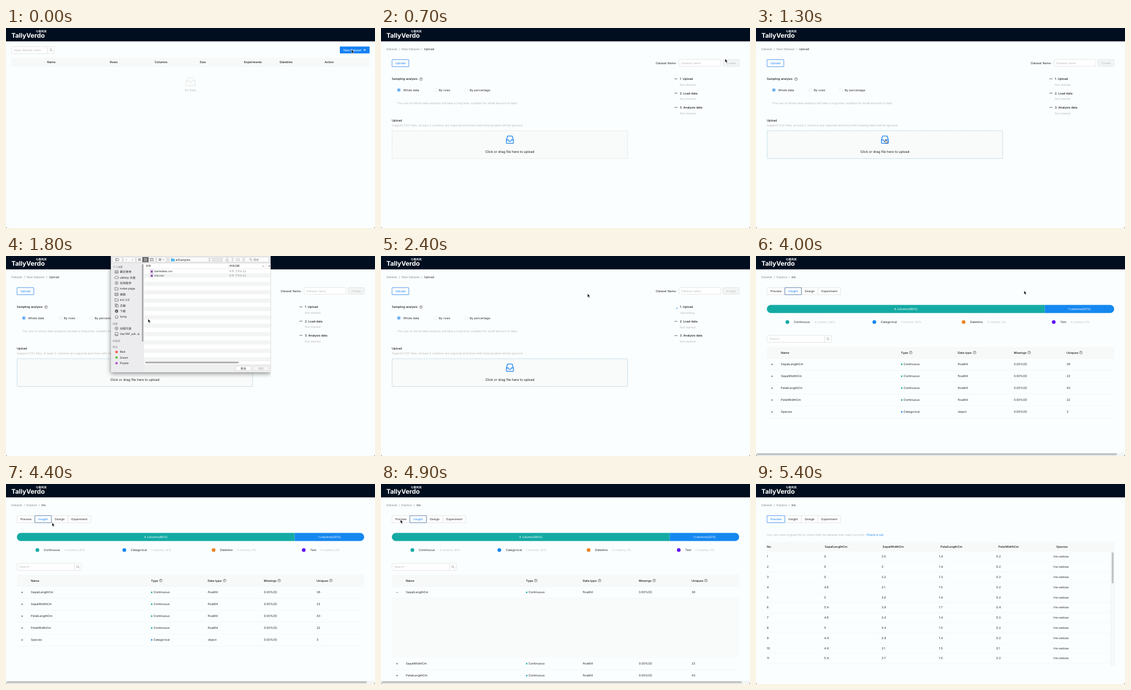
Write an HTML page that moves like this. It is 682 px wide and 370 px high and loops after 5.5 s.

```html
<!DOCTYPE html>
<html lang="en">
<head>
<meta charset="utf-8">
<title>Dataset upload</title>
<style>
html, body { margin: 0; width: 100%; height: 100%; overflow: hidden; background: #fbfefe; }
svg { display: block; width: 682px; height: 370px; }
text { font-family: Inter, "Noto Sans CJK SC", "Noto Sans CJK", sans-serif; text-rendering: geometricPrecision; white-space: pre; }
</style>
</head>
<body>
<svg id="stage" viewBox="0 0 682 370" xmlns="http://www.w3.org/2000/svg"></svg>
<script>
const LOOP = 5500, STEP = 100;
const BLUE = '#1681f5', INK = '#262829', GREY = '#b9bbbb', LINE = '#dadcdc', TEAL = '#14aaa4';
const stage = document.getElementById('stage');

// y is the vertical middle of the text
const text = (x, y, s, { c = INK, size = 5.5, w = 400, a = 'start' } = {}) =>
  `<text x="${x}" y="${y + size * 0.36}" fill="${c}" font-size="${size}" font-weight="${w}" text-anchor="${a}">${s}</text>`;
const mid = (x, y, s, o = {}) => text(x, y, s, { ...o, a: 'middle' });
const bold = (x, y, s) => text(x, y, s, { w: 500, c: '#161818' });
const pale = (x, y, s, o = {}) => text(x, y, s, { c: GREY, ...o });
const rect = (x, y, w, h, fill, stroke = 'none', rx = 0, more = '') =>
  `<rect x="${x}" y="${y}" width="${w}" height="${h}" fill="${fill}" stroke="${stroke}" stroke-width=".7" rx="${rx}" ${more}/>`;
const dot = (x, y, r, fill, stroke = 'none', sw = 0.6) =>
  `<circle cx="${x}" cy="${y}" r="${r}" fill="${fill}" stroke="${stroke}" stroke-width="${sw}"/>`;
const path = (d, stroke, sw = 0.7, fill = 'none') =>
  `<path d="${d}" stroke="${stroke}" stroke-width="${sw}" fill="${fill}" stroke-linejoin="round"/>`;
const at = (x, y, s) => `<g transform="translate(${x} ${y})">${s}</g>`;
const list = (items, f) => items.map(f).join('');

const help = (x, y) => dot(x, y, 2.6, 'none', '#444') + mid(x, y, '?', { size: 4.2, w: 600, c: '#444' });
const lens = (x, y) => dot(x - 0.5, y - 0.6, 1.9, 'none', '#888') + path(`M${x + 0.9} ${y + 0.8}l1.7 1.8`, '#888', 0.8);

function frame() {
  return rect(0, 0, 682, 370, '#fbfefe') + rect(0, 0, 682, 24.7, '#010e1f') +
    text(10, 14.2, 'TallyVerdo', { c: '#fff', size: 11.8, w: 700 }) +
    text(55, 6.3, '七卷风岚', { c: '#fff', size: 5, w: 700 });
}

const corners = () => path('M0 370v-2q.2 1.8 2 2zM682 370v-2q-.2 1.8-2 2z', 'none', 0, '#111');

function search(x, y, w, hint) {
  return rect(x, y, w, 12.6, '#fff', LINE, 1) + rect(x + w, y, 12.3, 12.6, '#fff', LINE, 1) +
    pale(x + 4.3, y + 6.3, hint) + lens(x + w + 6.2, y + 6.3);
}

function crumbs(parts) {
  return list(parts, ([x, s], i) => text(x, 39, s, { c: i === parts.length - 1 ? INK : '#8b8d8d' }));
}

// tabs: [left, right, label]
function tabs(items, active, tint = BLUE) {
  const box = ([l, r], stroke) => rect(l, 58.6, r - l, 13, stroke === LINE ? '#fff' : 'none', stroke, 0.6);
  return list(items, i => box(i, LINE)) + box(items[active], tint) +
    list(items, ([l, r, s], n) => mid((l + r) / 2, 65.2, s, { c: n === active ? BLUE : INK }));
}

function homePage(t) {
  const heads = [[76, 'Name'], [192, 'Rows'], [275, 'Columns'], [358, 'Size'], [440, 'Experiments'], [506, 'Datetime'], [589, 'Action']];
  let s = search(10.4, 34.5, 66.6, 'Input dataset name') +
    rect(617, 34.3, 55, 12.8, BLUE, 'none', 1) +
    text(623.7, 40.8, 'New Dataset', { c: '#fff' }) +
    path('M660.6 39.4h4.4l-2.2 2.9z', 'none', 0, '#fff') +
    rect(10, 54.6, 662, 16.6, '#f7f9f9') + path('M10 71.3h662', '#eef0f0', 0.5) +
    list(heads, ([x, h]) => bold(x, 62.9, h)) +
    `<ellipse cx="341" cy="105.5" rx="11" ry="2.4" fill="#f1f3f3"/>` +
    path('M332.5 97.5l3.4-5.6h10.2l3.4 5.6v8.3q0 1-1 1h-15q-1 0-1-1z', '#d5d7d7', 0.6, '#fafbfb') +
    path('M332.5 97.5h4.6q.9 0 1 1.1.2 1.5 1.4 1.5h3q1.200 0 1.400-1.500.1-1.100 1-1.100h4.600', '#d5d7d7', 0.6) +
    mid(341, 114.7, 'No Data', { c: GREY });
  if (t >= 300) {
    s += rect(616.6, 49, 55.8, 35, '#fff', 'none', 1, 'style="filter:drop-shadow(0 .8px 1.2px #0003)"') +
      (t >= 500 ? rect(616.6, 51, 55.8, 15.5, '#e8f5fd') : '') +
      text(622, 58.8, 'Upload') + text(622, 74.4, 'Import');
  }
  return s;
}

const tick = (x, y) => path(`M${x} ${y}l1.900 2 3.700-4.500`, '#2fa34a', 0.9);
const dash = (x, y) => path(`M${x} ${y}h5.500`, '#555', 0.9);

function steps(t) {
  const busy = t >= 2300 && t < 2600;
  const done = [2600, 2800, 3000].map(v => t >= v);
  const titles = ['1. Upload', '2. Load data', '3. Analysis data'];
  const notes = [
    ['Elapsed 0.00s, file size 4.50 KB'],
    ['Elapsed 0.03s, data shape is (151,', '5),&#160; load 151 rows'],
    ['Elapsed 0.09s, there are 4', 'continuous, 1 categorical, 0', 'datetime features']
  ];
  let y = 94.3, s = '';
  titles.forEach((title, i) => {
    const spin = busy && i === 0;
    const lines = done[i] ? notes[i] : [spin ? 'Uploading...' : 'Not started'];
    if (done[i]) s += tick(542.3, y);
    else if (spin) {
      s += `<path d="M548.400 94.800q.100 2.600-3.400 3" fill="none" stroke="${BLUE}" stroke-width=".8" transform="rotate(${(t - 2400) * 0.3} 546.200 95.600)"/>`;
    } else s += dash(542.3, y - 0.2);
    s += bold(552.3, y, title);
    lines.forEach((l, n) => { s += pale(552.3, y + 10.7 + n * 9, l); });
    y += 26.4 + (lines.length - 1) * 9 + (spin ? 0.4 : 0);
  });
  return s;
}

function inbox(x, y) {
  return at(x, y, path('M-6.400 .6l2.200-7.200h8.400l2.200 7.200v5.600q0 .8-.8.8h-11.200q-.8 0-.8-.8z', BLUE, 1.3) +
    path('M-6.400 .6h3.700q.4 2.800 2.700 2.800t2.700-2.800h3.700', BLUE, 1.3));
}

function uploadPage(t) {
  const ready = t >= 3100, hover = t >= 1200 && t < 2600;
  const bar = [[20.4, 51.4, 'Upload'], [51.4, 84.5, 'Preview'], [84.5, 115.4, 'Insight']];
  const radios = [[33, 41, 'Whole data'], [100.7, 107, 'By rows'], [157.3, 164, 'By percentage']];
  return crumbs([[10, 'Dataset'], [33, '/'], [38, 'New Dataset'], [74.3, '/'], [79.5, 'Upload']]) +
    tabs(ready ? bar : bar.slice(0, 1), 0) +
    text(508, 64.6, 'Dataset Name :') +
    rect(551, 58.3, 77, 12.4, '#fff', LINE, 1) +
    (ready ? text(555, 64.6, 'iris') : pale(555, 64.6, 'Dataset name')) +
    rect(632.3, 58.3, 29.6, 12.4, ready ? BLUE : '#f3f5f5', ready ? BLUE : LINE, 1) +
    mid(647.1, 64.6, 'Create', { c: ready ? '#fff' : GREY }) +
    bold(20, 94.5, 'Sampling analysis') + help(74, 94.5) +
    list(radios, ([x, l, s], i) => dot(x, 114.7, 3, '#fff', i ? LINE : BLUE) +
      (i ? '' : dot(x, 114.7, 1.7, BLUE)) + text(l, 114.8, s)) +
    pale(30, 138.6, 'The use of whole data analysis will take a long time, suitable for small amount of data') +
    bold(20, 171, 'Upload') +
    pale(20, 180, 'Support CSV files, at least 2 columns are required and lines with missing label will be ignored') +
    rect(20.4, 190, 435.5, 51.6, '#f9fafa', hover ? '#86bcd6' : '#d3d5d5', 1, 'stroke-dasharray="2 1.200"') +
    inbox(238.2, 206.4) +
    mid(238.2, 228.6, 'Click or drag file here to upload', { size: 6.1, c: '#161818' }) +
    steps(t);
}

const folder = (x, y, c, fill = 'none') => path(`M${x - 3} ${y - 2.400}h2.300l.8.9h2.900v4h-6z`, c, 0.7, fill);

const glyphs = {
  box: (x, y) => rect(x - 3, y - 2.4, 6, 4.8, 'none', '#555', 0.6) + path(`M${x - 3} ${y - 0.6}h6M${x - 3} ${y + 1}h6`, '#555', 0.5),
  cloud: (x, y) => path(`M${x - 2.200} ${y + 2}q-1.500-.1-1.500-1.500 0-1.300 1.400-1.500.5-1.700 2.300-1.700 1.700 0 2.200 1.500 1.700.1 1.700 1.600 0 1.500-1.500 1.600z`, '#555'),
  disc: (x, y) => dot(x, y, 2.8, 'none', '#555', 0.7) + dot(x, y, 0.9, '#555'),
  solid: (x, y) => dot(x, y, 3, '#555') + path(`M${x} ${y - 1.600}v3M${x - 1.200} ${y + 0.300}l1.200 1.200 1.200-1.200`, '#eee'),
  folder: (x, y) => folder(x, y, '#555'),
  pages: (x, y) => rect(x - 2.6, y - 2.8, 3.7, 4.5, 'none', '#555') + rect(x - 0.8, y - 1.4, 3.7, 4.4, '#ececee', '#555'),
  home: (x, y) => path(`M${x - 3.200} ${y}l3.200-3 3.200 3M${x - 2.200} ${y - 0.500}v3.300h4.400v-3.300`, '#555'),
  drive: (x, y) => rect(x - 2.6, y - 3, 5.2, 6, 'none', '#555', 0.6) + path(`M${x - 2.600} ${y + 1.300}h5.200`, '#555')
};

function sidebar() {
  const items = [[29.5, 'box', '最近使用'], [39.8, 'cloud', 'uMisty 云盘'], [50, 'disc', '应用程序'], [60.5, 'folder', 'notes.page'],
    [71, 'box', '桌面'], [81.2, 'folder', 'kvt-3.0'], [91.6, 'pages', '文稿'], [102, 'solid', '下载'], [112.5, 'home', 'lomq'],
    [134, 'disc', '远程光盘'], [144.5, 'drive', 'VexTAP_edi…']];
  const heads = [[20, '个人收藏'], [125, '设备'], [157, '共享的'], [168.3, '标记']];
  const tags = [[177.5, '#fc4b48', 'Red'], [187.8, '#62c13a', 'Green'], [198.2, '#b45bd0', 'Purple']];
  return rect(194, 14, 61, 201, '#ececee') +
    list(heads, ([y, s]) => text(197, y, s, { size: 4.7, c: '#777', w: 500 })) +
    list(items, ([y, g, s]) => glyphs[g](204.3, y) + text(210.5, y, s, { size: 5.3 })) +
    list(tags, ([y, c, s]) => dot(204.3, y, 2.3, c) + text(210.5, y, s, { size: 5.3 })) +
    path('M243.300 144.500l1.700-2 1.700 2zM243.300 145.300h3.400v.7h-3.400z', 'none', 0, '#555') +
    rect(251, 15, 3, 143.5, '#aeaeb0', 'none', 1.5);
}

function toolbar() {
  const btn = (x, w) => rect(x, 2, w, 9.4, '#fbfbfb', '#d0d0d0', 1.5);
  const cells = x => [0, 1, 2, 3].map(i => rect(x + (i % 2) * 2.4, 4.6 + (i >> 1) * 2.4, 1.7, 1.7, '#666')).join('');
  return rect(194, 0, 295, 14, '#e6e6e7') +
    btn(196.5, 18) + rect(202.5, 4.7, 6, 4.2, 'none', '#666') + path('M204.500 4.700v4.200', '#666') +
    btn(217, 22) + path('M223.500 4.800l-2 2 2 2M232.500 4.800l2 2-2 2', '#888') +
    btn(241, 35) + rect(252, 2, 11.6, 9.4, '#666') + cells(244.6) +
    path('M255 4.800h5.600M255 6.800h5.600M255 8.800h5.600', '#fff') +
    rect(266.5, 4.6, 5.6, 4.4, 'none', '#666') + path('M268.400 4.600v4.400M270.300 4.600v4.400', '#666', 0.5) +
    btn(278.5, 18) + cells(282.5) + path('M289.500 6l1.500 1.600 1.500-1.600', '#666') +
    btn(302, 79) + folder(308.3, 6.9, '#3aa7de', '#55bdec') + text(313.3, 6.8, 'allSamples', { size: 5.4 }) +
    path('M374.500 5.900l1.500-1.700 1.500 1.700M374.500 7.800l1.500 1.700 1.500-1.700', '#555') +
    btn(400, 17.5) + path('M407.500 6h-1v3.500h4.600v-3.500h-1M408.800 8v-4.300M407.500 4.800l1.300-1.300 1.300 1.300', '#999', 0.6) +
    btn(420, 17.5) + rect(425.5, 5, 6.4, 3.8, 'none', '#999', 1.6) +
    btn(441, 45) + lens(452.5, 6.8) + text(457, 6.8, '搜索', { size: 5.2, c: '#888' });
}

function dialog(t) {
  const drop = { 1500: -150, 1600: -45 }[t] || 0;
  const picked = t >= 2100;
  const files = [[28.2, 'bankdata.csv'], [35.9, 'iris.csv']];
  let s = rect(194, 0, 295, 215, '#f0f0f0', '#bbb', 1, 'style="filter:drop-shadow(0 2px 4px #0007)"') +
    rect(255, 14, 234, 187, '#fff');
  for (let i = 1; i < 22; i += 2) s += rect(255, 24.4 + i * 7.75, 234, 7.75, '#f3f4f4');
  if (picked) s += rect(255, 32.1, 234, 7.8, '#1565d8');
  s += path('M255 23.700h234M411 15v8M480.500 15v8', '#d5d5d5', 0.5) +
    text(258.5, 18.8, '名称', { size: 4.7 }) + text(413, 18.8, '修改日期', { size: 4.7 }) + text(485, 18.8, '大', { size: 4.7 }).replace('大', 'A') +
    path('M473.500 18l1.700 1.600 1.700-1.600', '#555') +
    list(files, ([y, n], i) => {
      const on = picked && i === 1;
      return rect(267, y - 3, 4.6, 6, '#fff', '#b9a3c4') + rect(267.7, y - 1, 3.2, 3.2, '#7b2f9b') +
        text(274.3, y, n, { size: 5.3, c: on ? '#fff' : INK }) +
        text(412, y, '今天 下午6:32', { size: 4.9, c: on ? '#fff' : '#8a8a8a' });
    }) +
    rect(257, 195.6, 173, 3, '#a9a9a9', 'none', 1.5) +
    rect(255, 201, 234, 14, '#efefef') + path('M255 201h234', '#d5d5d5', 0.5) +
    rect(424.5, 203.8, 28.5, 8, '#fff', '#cfcfcf', 1.5) + mid(438.7, 207.8, '取消', { size: 5 }) +
    rect(457, 203.8, 28, 8, '#f6f6f6', '#dcdcdc', 1.5) + mid(471, 207.8, '选取', { size: 5, c: picked ? INK : '#aaa' }) +
    sidebar() + toolbar();
  return `<clipPath id="sheet"><rect x="180" width="309.500" height="235"/></clipPath><g clip-path="url(#sheet)">${at(0, drop, s)}</g>`;
}

const exploreTabs = [[20.4, 53.3, 'Preview'], [53.3, 84, 'Insight'], [84, 114.6, 'Design'], [114.6, 156.6, 'Experiment']];
const exploreTop = (n, tint) => crumbs([[10, 'Dataset'], [33, '/'], [38, 'Explore'], [60.3, '/'], [65.4, 'iris']]) + tabs(exploreTabs, n, tint);

function insightPage(t) {
  const open = t >= 4600 ? 110 : 0;
  const kinds = [[58, TEAL, 'Continuous', 108, '4 columns, 80%'], [218.7, '#1588f0', 'Categorical', 268, '1 columns, 20%'],
    [383.7, '#ea8428', 'Datetime', 427, '0 columns, 0%'], [550.3, '#6214f5', 'Text', 581, '0 columns, 0%']];
  const heads = [[46, 'Name'], [268, 'Type', 286], [373, 'Data type', 404], [476.5, 'Missings', 504.8], [574, 'Uniques', 600.5]];
  const rows = [['SepalLengthCm', 36], ['SepalWidthCm', 23], ['PetalLengthCm', 43], ['PetalWidthCm', 22], ['Species', 3]];
  return exploreTop(1, '#2f6298') +
    path('M533.700 90.500h-506.200a7.500 7.500 0 0 0 0 15h506.200z', 'none', 0, TEAL) +
    path('M533.700 90.500h120.800a7.500 7.500 0 0 1 0 15h-120.800z', 'none', 0, '#1588f0') +
    mid(277, 98.2, '4 columns(80%)', { c: '#fff' }) + mid(597.8, 98.2, '1 columns(20%)', { c: '#fff' }) +
    list(kinds, ([x, c, k, vx, v]) => dot(x, 122.2, 3.4, c) + text(x + 12, 122.2, k) + pale(vx, 122.2, v, { size: 5 })) +
    search(20.4, 147, 106.4, 'Search') +
    rect(20, 168, 642, 21.3, '#f7f9f9') + path('M20 189.400h642', '#eceeee', 0.5) +
    list(heads, ([x, h, q]) => bold(x, 178.6, h) + (q ? help(q, 178.6) : '')) +
    (open ? rect(20, 211.5, 642, open, '#f9fafa') : '') +
    list(rows, ([name, uniq], i) => {
      const y = 200.5 + i * 22 + (i ? open : 0), last = i === 4;
      return path(`M27.900 ${y}h3.600` + (open && !i ? '' : `M29.700 ${y - 1.800}v3.600`), '#444', 0.6) +
        text(46, y, name) + dot(269.3, y, 1.4, last ? '#1588f0' : TEAL) +
        text(272.7, y, last ? 'Categorical' : 'Continuous') +
        text(373, y, last ? 'object' : 'float64') + text(476.5, y, '0.00%(0)') + text(574, y, uniq) +
        path(`M20 ${y + 11}h642`, '#eceeee', 0.5);
    }) +
    rect(0, 364, 682, 6, '#f3f5f5') + rect(1, 365, 666, 3.6, '#bfc1c1', 'none', 1.8);
}

function previewPage() {
  const heads = ['No.', 'SepalLengthCm', 'SepalWidthCm', 'PetalLengthCm', 'PetalWidthCm', 'Species'];
  const rows = ['0 3.5 1.4 0.2', '0 3 1.4 0.2', '0 3.2 1.3 0.2', '4.6 3.1 1.5 0.2', '5 3.6 1.4 0.2', '5.4 3.9 1.7 0.4',
    '4.6 3.4 1.4 0.3', '5 3.4 1.5 0.2', '4.4 2.9 1.4 0.2', '4.9 3.1 1.5 0.1', '5.4 3.7 1.5 0.2'];
  return exploreTop(0) +
    pale(20, 94.5, 'You can view original file to check that the dataset was read correctly') +
    text(204.3, 94.5, 'Check it out', { c: BLUE }) +
    rect(20, 107, 642, 18, '#f7f9f9') +
    list(heads, (h, i) => bold(20 + i * 107, 116.2, h)) +
    list(rows, (r, i) => {
      const y = 134.5 + i * 18.8;
      return list([i + 1, ...r.split(' '), 'Iris-setosa'], (v, n) => text(20 + n * 106, y, v)) +
        path(`M20 ${y + 9.400}h636`, '#eff1f1', 0.5);
    }) +
    rect(656.2, 125, 5.8, 210, '#f8f9f9', '#e9ebeb') + rect(657.5, 126.5, 3.4, 57.5, '#bfc1c1', 'none', 1.7);
}

// pointer: time, x, y
const moves = [[0, 638.5, 39.8], [300, 640, 42], [500, 636, 57], [700, 636, 57], [1200, 239.5, 206.5], [1500, 239.5, 206.5],
  [1800, 262.7, 116.5], [2100, 282, 36], [2200, 282, 36], [2400, 381.8, 69.8], [3500, 384.3, 71.6], [3600, 384.3, 71.6],
  [3800, 645, 64], [3900, 645, 64], [4200, 68, 65], [4400, 85.2, 71.6], [4600, 29.5, 200], [4700, 29.5, 200], [4900, 36, 66], [5100, 36, 66]];

function pointer(t) {
  if (t > 5100) return '';
  const n = moves.findIndex(m => m[0] > t);
  const [a, b] = n < 1 ? [moves[moves.length - 1], moves[moves.length - 1]] : [moves[n - 1], moves[n]];
  const u = a === b ? 0 : (t - a[0]) / (b[0] - a[0]), e = u * u * (3 - 2 * u);
  const hand = t >= 1200 && t < 1500;
  const shape = hand
    ? path('M-.7 3.500v-3q0-.8.7-.8t.7.800v2l2.700.600q.8.200.7 1l-.5 2.100h-3.600l-2-2.200q-.4-.7.300-.900z', '#222', 0.7, '#fff')
    : path('M0 0v6.600l1.500-1.400 1.100 2.500 1.200-.5-1.100-2.400h2z', '#fff', 0.5, '#000');
  return at(a[1] + (b[1] - a[1]) * e, a[2] + (b[2] - a[2]) * e, shape);
}

function page(t) {
  if (t < 700) return homePage(t);
  if (t < 4000) return uploadPage(t) + (t >= 1500 && t < 2300 ? dialog(t) : '');
  return t < 5000 ? insightPage(t) : previewPage();
}

let shown = -1;
function draw(now) {
  const t = Math.floor((now % LOOP) / STEP) * STEP;
  if (t !== shown) {
    stage.innerHTML = frame() + page(t) + corners() + pointer(t);
    shown = t;
  }
}

const start = performance.now();
function run() {
  draw(performance.now() - start);
  requestAnimationFrame(run);
}
run();
</script>
</body>
</html>
```
